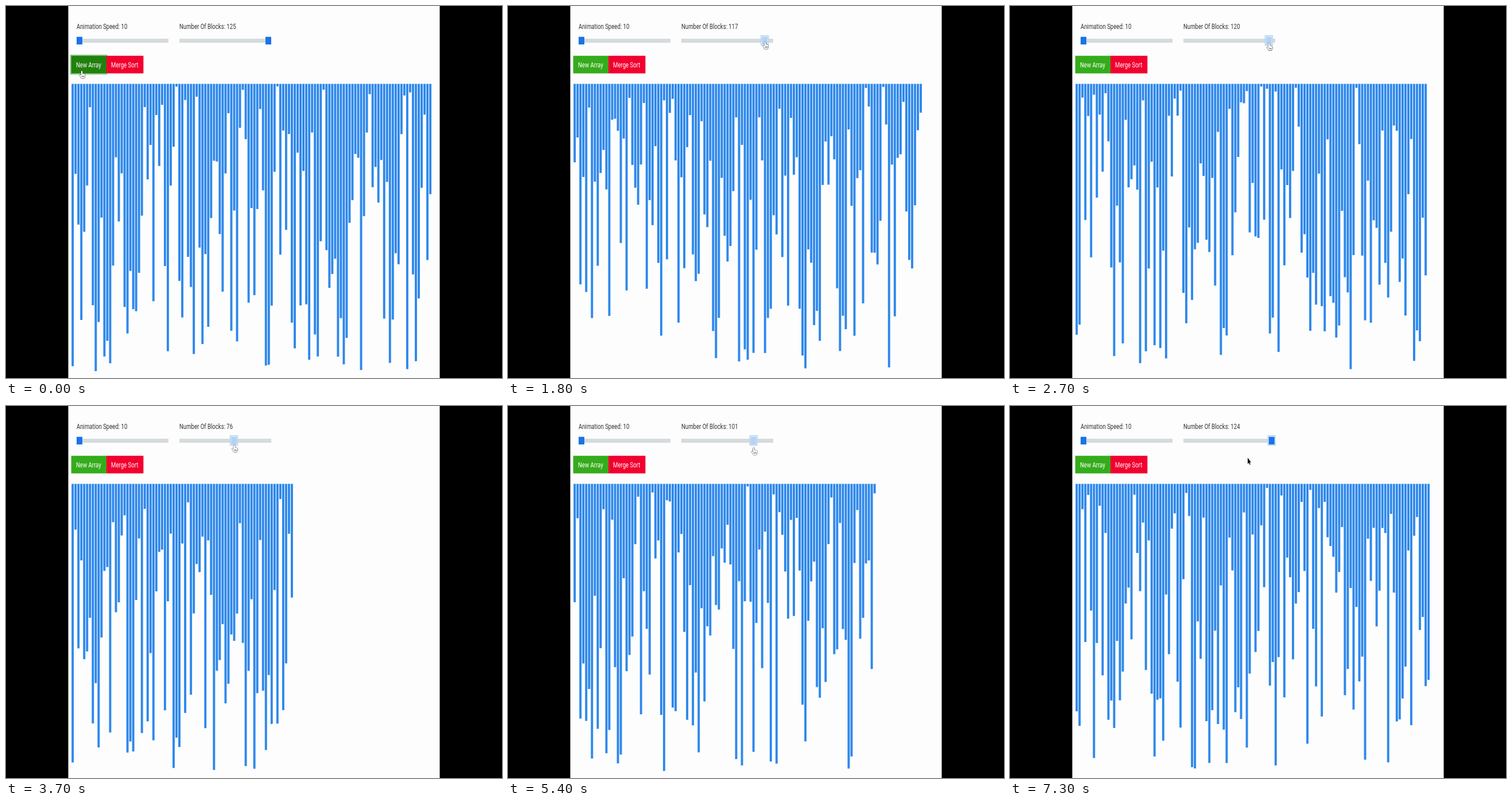
Recreate the animation shown at these times as an HTML page with a canvas. Size 864 px wide and 648 px high, loop 7400 ms.

```html
<!DOCTYPE html>
<html lang="en">
<head>
<meta charset="utf-8">
<title>Merge sort visualizer</title>
<style>
  html, body { margin: 0; width: 100%; height: 100%; overflow: hidden; background: #000; }
  canvas { display: block; }
</style>
</head>
<body>
<canvas id="stage" width="864" height="648"></canvas>
<script>
const ctx = document.getElementById('stage').getContext('2d');
const LOOP = 7400, STEP = 100;
const LAST_CLICK = 9, HOVER = 12, GRAB = 15, RELEASE = 72;
const BLUE = '#1a73e8', RING = '#a9cdf0';

// Turning points of the slider drag: [step, number of blocks]
const TURNS = [[GRAB, 125], [22, 105], [25, 123], [37, 76], [46, 107], [50, 113],
  [56, 97], [62, 108], [73, 124]];

const clamp = t => Math.min(1, Math.max(0, t));
const mix = (a, b, t) => a + (b - a) * t;
const ease = t => (1 - Math.cos(Math.PI * t)) / 2;

function valueAt(step) {
  const next = TURNS.findIndex(turn => turn[0] > step);
  if (next === 0) return TURNS[0][1];
  if (next < 0) return TURNS[TURNS.length - 1][1];
  const [t0, a] = TURNS[next - 1], [t1, b] = TURNS[next];
  return Math.round(mix(a, b, ease((step - t0) / (t1 - t0))));
}

const handleX = value => 457 - (125 - value) * 1.224;

function pointerAt(step) {
  if (step < GRAB) {
    const t = clamp((step - LAST_CLICK) / (HOVER - LAST_CLICK));
    return [mix(132, 454, t), mix(113, 61, t)];
  }
  if (step <= RELEASE) return [handleX(valueAt(step)) + 0.5, 61 + (step - GRAB) * 0.28];
  return [414, 90];
}

function randomFrom(seed) {
  let state = seed * 7919 + 12345;
  return () => {
    state = (state + 0x6D2B79F5) | 0;
    let n = Math.imul(state ^ state >>> 15, 1 | state);
    n = n + Math.imul(n ^ n >>> 7, 61 | n) ^ n;
    return ((n ^ n >>> 14) >>> 0) / 4294967296;
  };
}

function rect(color, x, y, w, h) {
  ctx.fillStyle = color;
  ctx.fillRect(x, y, w, h);
}

// The whole page is shown in a narrowed aspect ratio.
function text(label, x, y, color) {
  ctx.save();
  ctx.translate(x, y);
  ctx.scale(0.8, 1);
  ctx.font = '12px Roboto, sans-serif';
  ctx.fillStyle = color;
  ctx.fillText(label, 0, 0);
  ctx.restore();
}

function slider(x, knob, focused, pressed) {
  rect('#d6dadd', x, 57, 160, 7);
  if (focused) {
    rect(RING, knob - 7, 51, 14, 18);
    rect('#deecf8', knob - 6, 52, 12, 16);
  }
  rect(pressed ? '#b5d3f3' : BLUE, knob - 5, 53.7, 10, 13.3);
}

function bars(step) {
  let since = step;
  while (since > LAST_CLICK && valueAt(since - 1) === valueAt(step)) since--;
  // The array is built from the value before the latest slider change.
  const count = valueAt(since - 1);
  const random = randomFrom(since <= LAST_CLICK ? since >> 1 : since);
  for (let i = 0; i < count; i++) {
    rect('#2e88ec', 114.2 + i * 5.024, 135.6, 3.9, 4 + random() * 498);
  }
}

const HAND = new Path2D('M-1.2 1Q0-.8 1.2 1L1.4 5Q2.6 4.3 3.2 5.4Q4.4 5 4.8 6.2Q6 6 6 7.4' +
  'L5.6 10.2L4.6 13H-.8L-2.4 10L-4 7.6Q-3.6 6.2-2.2 7.2L-1.2 8.2Z');
const KNUCKLES = new Path2D('M.4 8.5V11M2.1 8.5V11M3.8 8.5V11');
const ARROW = new Path2D('M0 0V11L2 8.8L3.5 12.4L4.9 11.6L3.5 8.2H6Z');

function pointer(step) {
  const arrow = step > LAST_CLICK && step < HOVER || step >= RELEASE;
  ctx.save();
  ctx.translate(...pointerAt(step));
  ctx.lineWidth = 1;
  ctx.lineJoin = 'round';
  ctx.fillStyle = arrow ? '#111' : '#fff';
  ctx.strokeStyle = arrow ? '#fff' : '#222';
  ctx.stroke(arrow ? ARROW : HAND);
  ctx.fill(arrow ? ARROW : HAND);
  ctx.lineWidth = 0.7;
  if (!arrow) ctx.stroke(KNUCKLES);
  ctx.restore();
}

function draw(step) {
  const value = valueAt(step);
  const grabbed = step >= GRAB;
  const clicking = step <= LAST_CLICK && step % 2 === 0;

  rect('#000', 0, 0, 864, 648);
  rect('#fdfdfd', 108.5, 0, 647, 648);

  text('Animation Speed: 10', 123, 40, '#333');
  text('Number Of Blocks: ' + value, 302, 40, '#333');
  slider(123, 128, false, false);
  slider(302, handleX(value), grabbed, grabbed && step < RELEASE);

  if (!grabbed) rect('#93d08c', 111.7, 84.7, 65, 34.8);
  rect(grabbed ? '#35ac1c' : clicking ? '#22800f' : '#2a8a14', 113.6, 86.7, 61.4, 30.7);
  rect('#f2002f', 175, 86.7, 64.4, 30.7);
  text('New Array', 122, 107, '#fff');
  text('Merge Sort', 183, 107, '#fff');

  bars(step);
  pointer(step);
}

const start = performance.now();
function frame() {
  draw(Math.floor((performance.now() - start) % LOOP / STEP));
  requestAnimationFrame(frame);
}
frame();
</script>
</body>
</html>
```
